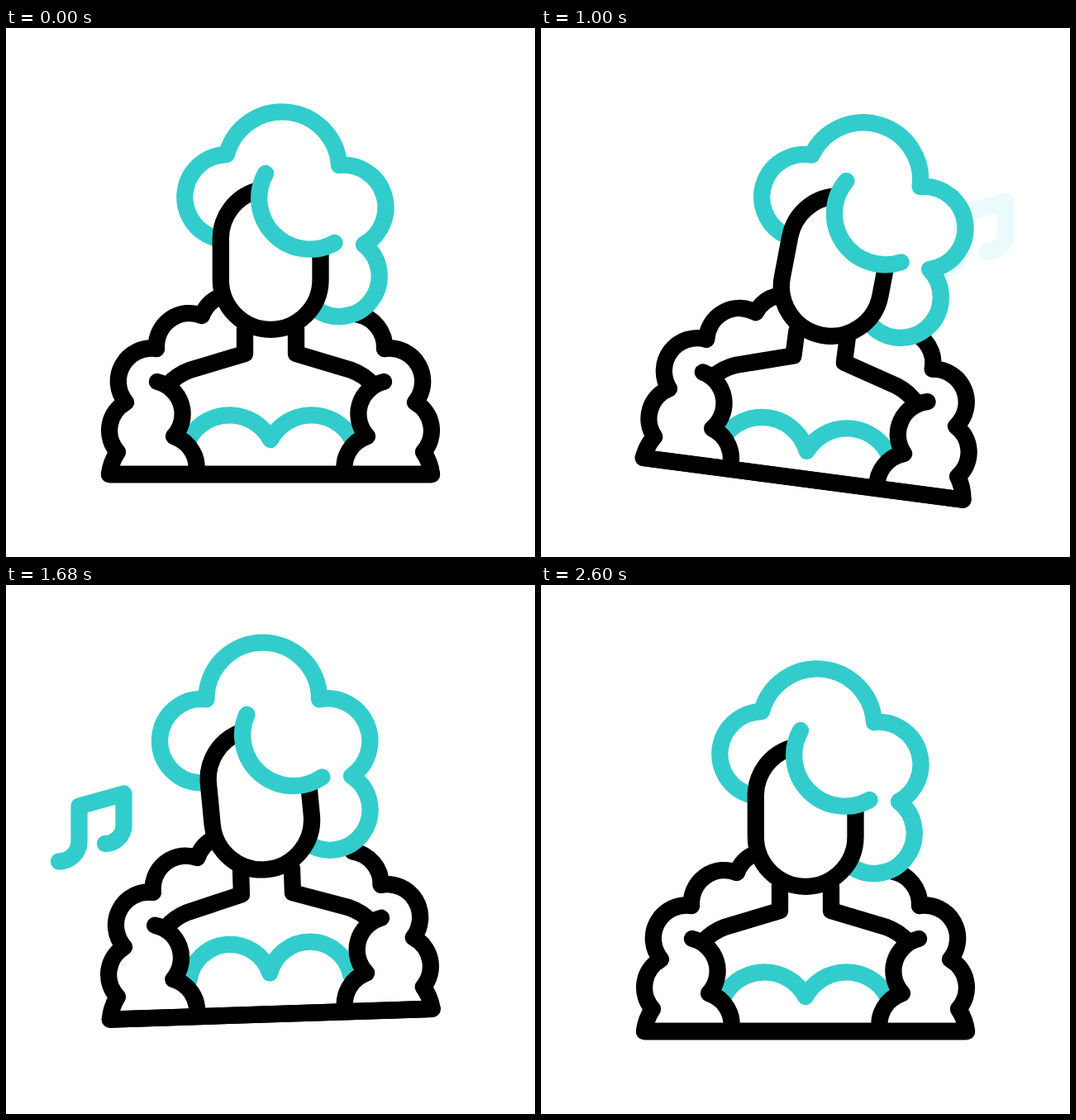
Write an HTML page that moves like this. It is 640 by 640 pixels and loops after 2.84 s.

```html
<!DOCTYPE html>
<html lang="en">
<head>
<meta charset="utf-8">
<title>Singer</title>
<style>
html, body { margin: 0; height: 100%; overflow: hidden; background: #fff; }
svg { display: block; width: 100vw; height: 100vh; }
path { fill: none; stroke: #000; stroke-width: 20.3; stroke-linecap: round; stroke-linejoin: round; }
.teal { stroke: #3cc; }
.solid { fill: #fff; }
</style>
</head>
<body>
<svg viewBox="0 0 640 640">
  <defs>
    <g id="half">
      <path d="M515 540H125A60 60 0 0 1 135 513A39 39 0 0 1 145 453A40 40 0 0 1 182 388"/>
      <path d="M289 364V394L222 414Q206 420 196 432"/>
      <path d="M183 428A40 40 0 0 1 203 494A40 40 0 0 1 230 539"/>
    </g>
    <path id="note" class="teal" d="M484 82A24.5 24.5 0 0 0 508.5 58V15L562.5 0V38A22.5 22.5 0 0 1 540 60.5"/>
  </defs>
  <g id="body">
    <path id="bodice" class="teal"/>
    <use href="#half"/>
    <use href="#half" transform="matrix(-1 0 0 1 640 0)"/>
    <path d="M182 388A40 40 0 0 1 237 348A40 40 0 0 1 259 325"/>
    <path d="M458 388A40 40 0 0 0 425 346.6"/>
    <g id="head">
      <path id="hair" class="teal solid"/>
      <path class="solid" d="M303 197A60.5 60.5 0 0 0 259.8 254V304.5A60.3 60.3 0 0 0 380.5 304.5V272"/>
      <path class="teal" d="M314 176A61.6 61.6 0 0 0 397.5 260"/>
    </g>
  </g>
  <use id="right" href="#note"/>
  <use id="left" href="#note"/>
</svg>
<script>
const LOOP = 2840, STEP = 40, END = 2600;
const el = id => document.getElementById(id);
const clamp = v => Math.min(1, Math.max(0, v));
const ease = u => (1 - Math.cos(Math.PI * clamp(u))) / 2;

// Keys are [time, value] pairs, eased in between
const lift = [[0, 0], [670, 25], [1440, -25], [2330, 0]];
const sway = [[0, 0], [420, -8], [940, 8], [1460, -8], [1980, 8.1], [2540, 0]];
const nod = [[0, 0], [640, -4.8], [1120, 4.8], [1600, -4.3], [2060, 5.8], [2600, 0]];
const dip = [[0, 0], [700, 13.5], [1600, -8], [2400, 0]];

function valueAt(keys, t) {
  const i = keys.findIndex(k => k[0] > t);
  if (i < 0) return keys.at(-1)[1];
  const [t0, v0] = keys[i - 1], [t1, v1] = keys[i];
  return v0 + (v1 - v0) * ease((t - t0) / (t1 - t0));
}

// Circular arcs through the joints, each bulging by its own height
function lobes(points, bulges) {
  return points.map(([x, y], i) => {
    if (!i) return `M${x} ${y}`;
    const [px, py] = points[i - 1], s = bulges[i - 1];
    const h = Math.hypot(x - px, y - py) / 2, r = (h * h + s * s) / (2 * s);
    return `A${r} ${r} 0 ${s > h ? 1 : 0} 1 ${x} ${y}`;
  }).join('');
}

const joints = [[250, 253], [267, 153], [403, 166], [433, 262], [371, 337]];

function drawNote(id, x, y, starts, t) {
  const age = t - Math.max(...starts.filter(s => s <= t), -1e4);
  el(id).setAttribute('transform', `translate(${x} ${y - 0.25 * Math.min(age, 500)})`);
  el(id).setAttribute('opacity', ease(age / 120) * (1 - ease((age - 325) / 130)));
}

function draw(t) {
  const rise = valueAt(lift, t), tilt = valueAt(nod, t);
  const back = Math.max(0, -tilt) * 3, front = Math.max(0, tilt) * 2.4;
  const swell = 28.7 + Math.max(0, -rise) * 0.5;
  el('body').setAttribute('transform', `translate(0 ${rise}) rotate(${valueAt(sway, t)} 320 518)`);
  el('head').setAttribute('transform', `rotate(${tilt} 320 360)`);
  el('hair').setAttribute('d', lobes(joints, [42 + back, 58 + back, 41 + front, 50 + front / 3]));
  el('bodice').setAttribute('d', lobes([[222, 496], [320, 498 + valueAt(dip, t)], [418, 496]], [swell, swell]));
  drawNote('right', 0, 216, [0, 976], t);
  drawNote('left', -420, 286, [440, 1546], t);
}

function tick() {
  const t = performance.now() % LOOP;
  draw(Math.min(END, Math.floor(t / STEP) * STEP));
  requestAnimationFrame(tick);
}
tick();
</script>
</body>
</html>
```
